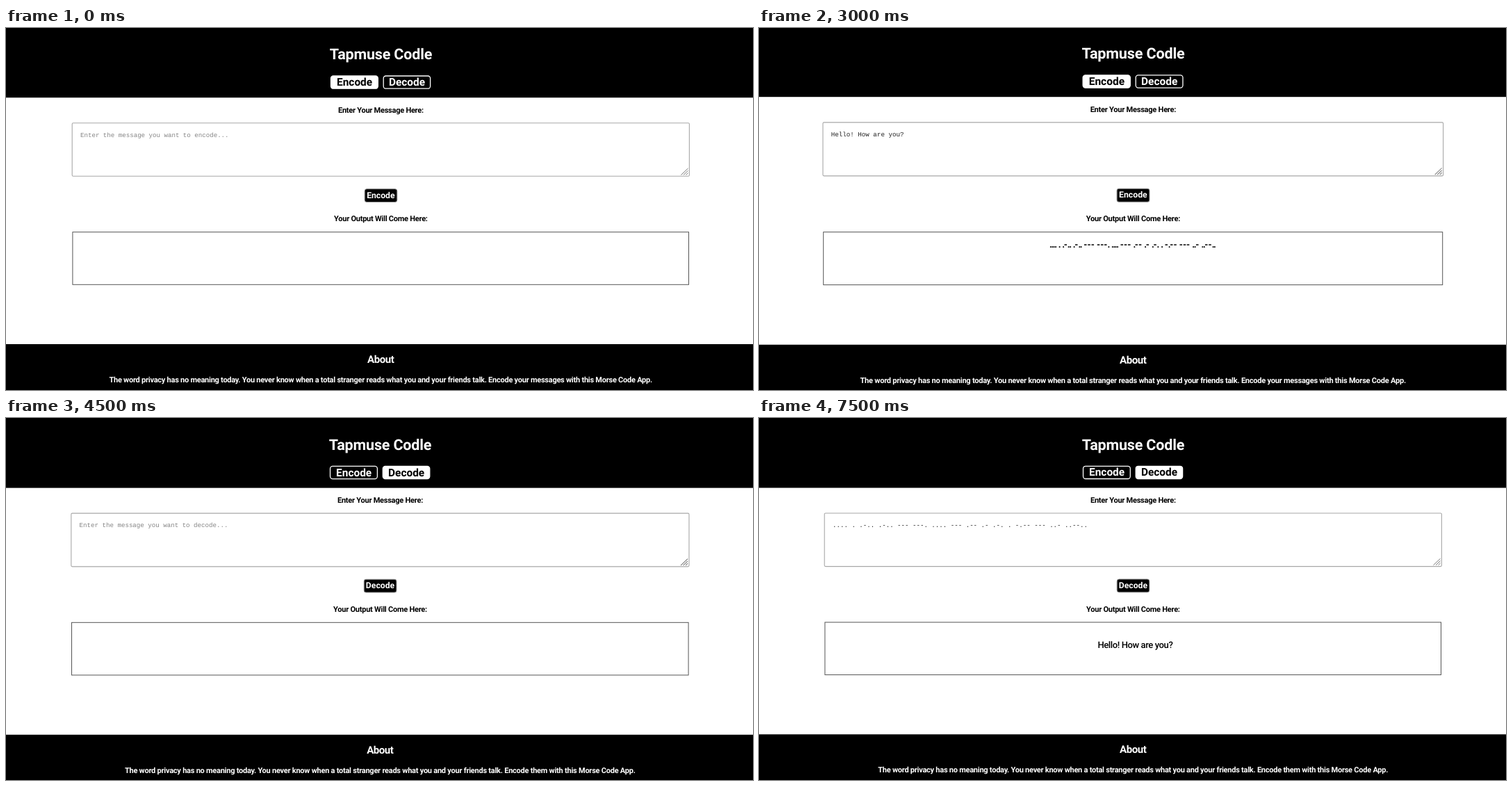
Recreate the animation shown at these times as an HTML page. Size 1075 by 521 pixels, loop 9000 ms.

```html
<!DOCTYPE html>
<html lang="en">
<head>
<meta charset="utf-8">
<title>Tapmuse Codle</title>
<style>
  html, body { margin: 0; width: 100%; height: 100%; overflow: hidden; background: #fff; }
  svg { display: block; width: 1075px; height: 521px; }
  text { font-family: Roboto, sans-serif; font-weight: 700; text-anchor: middle;
    text-rendering: geometricPrecision; white-space: pre; }
  .title { font-size: 21.5px; letter-spacing: -.008em; fill: #fff; }
  .tab { font-size: 15.4px; }
  .label { font-size: 11px; letter-spacing: -.0225em; }
  .btn { font-size: 12.2px; fill: #fff; }
  .about { font-size: 15px; letter-spacing: -.03em; }
  .light { fill: #fff; }
  .field { font: 9.15px "Courier New", "Liberation Mono", monospace; text-anchor: start; }
  .result { font-size: 13px; font-weight: 500; letter-spacing: -.03em; }
  .morse { font-size: 13px; text-anchor: start; }
</style>
</head>
<body>
<svg viewBox="0 0 1075 521">
  <g id="page">
    <rect x="-20" y="-20" width="1115" height="120.2"/>
    <text class="title" x="539.5" y="45.4">Tapmuse Codle</text>
    <g stroke="#fff" stroke-width="1.3">
      <rect id="encTab" x="467.5" y="69" width="67.8" height="18.2" rx="3.5"/>
      <rect id="decTab" x="543.2" y="69" width="67.4" height="18.2" rx="3.5"/>
    </g>
    <text id="encText" class="tab" x="501.6" y="83.2">Encode</text>
    <text id="decText" class="tab" x="577" y="83.2">Decode</text>

    <text class="label" x="539.4" y="121.6">Enter Your Message Here:</text>
    <rect id="glow" x="94.8" y="136.4" width="889" height="77.2" rx="2" fill="none" stroke="#cfe6fb" stroke-width="3.8"/>
    <rect id="area" x="95.2" y="136.7" width="888.2" height="76.6" rx="1.5" fill="#fff"/>
    <path d="M971.5 211.5l10-9.5M975 211.5l6.5-6.2M978.5 211.5l3-2.9" stroke="#777" stroke-width="1" fill="none"/>
    <text id="field" class="field" x="107" y="157"></text>
    <rect id="caret" x="211.4" y="148.6" width="1" height="11.5"/>

    <rect x="516.2" y="231.7" width="46.6" height="18.8" rx="3" stroke="#888" stroke-width="1"/>
    <text id="btn" class="btn" x="539.4" y="244.5">Encode</text>
    <text class="label" x="539.4" y="278.4">Your Output Will Come Here:</text>
    <rect x="95.9" y="293.7" width="886.6" height="75.6" fill="#fff" stroke="#555" stroke-width="1"/>
    <text id="morse" class="morse" y="316"></text>
    <text id="result" class="result" x="542.4" y="330.6">Hello! How are you?</text>

    <rect x="-20" y="455" width="1115" height="90"/>
    <text class="about light" x="539.2" y="481.7">About</text>
    <text id="blurb" class="label light" x="539.2" y="509.8"></text>
  </g>
</svg>
<script>
const $ = id => document.getElementById(id);
const STEP = 1500;
const HELLO = 'Hello! How are you?';
const MORSE = '.... . .-.. .-.. --- ---. .... --- .-- .- .-. . -.-- --- ..- ..--..';

// view: scale, x shift, y shift of the page
const scenes = [
  { mode: 'encode', view: [1, 0, 0] },
  { mode: 'encode', view: [1.0011, -2.1, .8], input: HELLO, focus: true },
  { mode: 'encode', view: [1.005, -3.7, -1.5], input: HELLO, out: 'morse' },
  { mode: 'decode', view: [1.0011, -1.5, .3] },
  { mode: 'decode', view: [1, -1, .3], input: MORSE },
  { mode: 'decode', view: [1, -1, .3], input: MORSE, out: 'result' }
];

const show = (id, on) => $(id).setAttribute('visibility', on ? 'visible' : 'hidden');

// Wide dashes and tight dots
function layMorse() {
  const advance = { '-': 5.15, '.': 2.4, ' ': 3.1 };
  let x = 419.6;
  const xs = [...MORSE].map(c => (x += advance[c]) - advance[c]);
  $('morse').setAttribute('x', xs.map(v => v.toFixed(2)).join(' '));
  $('morse').textContent = MORSE;
}

function setTab(name, on) {
  $(name + 'Tab').setAttribute('fill', on ? '#fff' : '#000');
  $(name + 'Text').setAttribute('fill', on ? '#000' : '#fff');
}

function draw({ mode, view: [s, x, y], input, focus, out }) {
  const enc = mode === 'encode';
  $('page').setAttribute('transform', `translate(${x} ${y}) scale(${s})`);
  setTab('enc', enc);
  setTab('dec', !enc);
  $('btn').textContent = enc ? 'Encode' : 'Decode';
  $('field').textContent = input || `Enter the message you want to ${mode}...`;
  $('field').setAttribute('fill', input ? '#222' : '#858585');
  $('area').setAttribute('stroke', focus ? '#3f8ae4' : '#a8a8a8');
  $('area').setAttribute('stroke-width', focus ? 1.5 : 1.1);
  show('glow', focus);
  show('caret', focus);
  show('morse', out === 'morse');
  show('result', out === 'result');
  $('blurb').textContent = 'The word privacy has no meaning today. You never know when a total stranger ' +
    `reads what you and your friends talk. Encode ${enc ? 'your messages' : 'them'} with this Morse Code App.`;
}

let current = -1;
const start = performance.now();
function tick() {
  const i = Math.floor((performance.now() - start) / STEP) % scenes.length;
  if (i !== current) draw(scenes[current = i]);
  requestAnimationFrame(tick);
}
layMorse();
tick();
</script>
</body>
</html>
```
